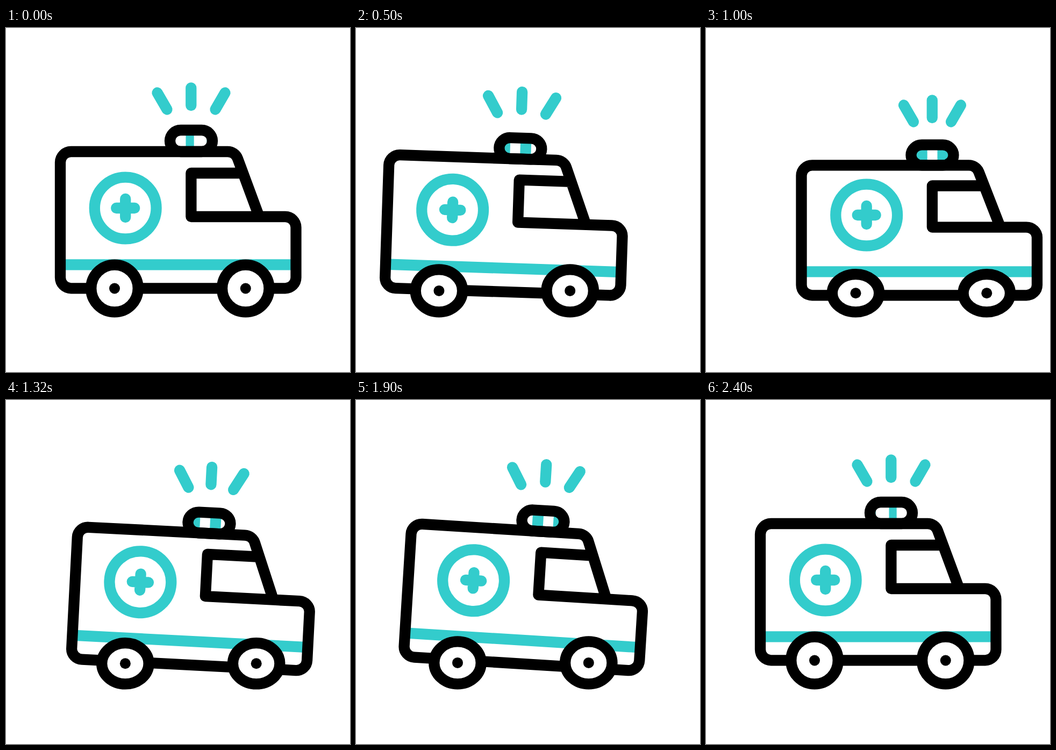
An HTML page that plays this animation: 640x640 px, repeating every 2.42 s.

```html
<!DOCTYPE html>
<html lang="en">
<head>
<meta charset="utf-8">
<title>Ambulance</title>
<style>
  html, body { margin: 0; width: 100%; height: 100%; overflow: hidden; background: #fff; }
  svg { display: block; width: 100%; height: 100%; }
  .line { fill: none; stroke: #000; stroke-width: 20.3; stroke-linejoin: round; }
  .teal { fill: none; stroke: #33cccc; stroke-width: 20.3; stroke-linecap: round; }
  .wheel { fill: #fff; stroke: #000; stroke-width: 20.3; }
</style>
</head>
<body>
<svg viewBox="0 0 640 640">
  <defs>
    <clipPath id="lampClip"><rect id="lampHole" x="305" width="79" rx="20"/></clipPath>
  </defs>
  <g id="car">
    <path id="rayL" class="teal" d="M281.5 120.5L299.5 151.5"/>
    <path id="rayM" class="teal" d="M344.3 111.5V144"/>
    <path id="rayR" class="teal" d="M407.5 120.5L389.5 151.5"/>
    <path d="M101 440.3H539.5" stroke="#33cccc" stroke-width="20.3"/>
    <circle class="teal" cx="222.2" cy="335" r="57.4"/>
    <path id="plus" class="teal"/>
    <g id="bands" clip-path="url(#lampClip)" fill="#33cccc">
      <rect/><rect/><rect/>
    </g>
    <rect id="lamp" class="line" x="305" width="79" rx="20"/>
    <path id="body" class="line"/>
  </g>
  <g id="wheels">
    <ellipse class="wheel" cx="202" rx="43.7"/>
    <ellipse class="wheel" cx="445.8" rx="43.7"/>
    <circle cx="202" r="10"/>
    <circle cx="445.8" r="10"/>
  </g>
</svg>
<script>
  const LOOP = 2420, STEP = 20, BEAT = 400;
  const FLOOR = 528.4, BASE = 484.3;
  const BAND = 20.2, GAP = 39;
  const $ = id => document.getElementById(id);
  const set = (el, attrs) => {
    for (const k in attrs) el.setAttribute(k, attrs[k]);
  };
  const mix = (a, b, k) => a + (b - a) * k;

  // Sine-eased interpolation through [time, value] keys
  function ease(keys, t) {
    for (let i = 1; i < keys.length; i++) {
      const [t0, a] = keys[i - 1], [t1, b] = keys[i];
      if (t <= t1) return mix(a, b, (1 - Math.cos(Math.PI * (t - t0) / (t1 - t0))) / 2);
    }
    return keys[keys.length - 1][1];
  }

  const DRIVE = [[0, 0], [600, -51], [1000, 76.5], [1600, -26], [2200, 0]];
  const TILT = [[0, 0], [400, 3.1], [800, -5], [1200, 5], [1600, -5], [2000, 5], [2400, 0]];
  const PULSE = [[0, 0], [400, -1], [800, 1], [1200, -1], [1600, 1], [2000, -1], [2400, 0]];

  // Rays swing in and out on each beat, resting at both ends of the loop
  const RAYS = [[0, 0]];
  for (let t = 200; t < 2400; t += 200) RAYS.push([t, t % BEAT ? 10 : -10]);
  RAYS.push([2400, 0]);

  function drawBody(s) {
    const y = v => BASE - (BASE - v) * s;
    const arc = (x, v) => `A20 ${20 * s} 0 0 1 ${x} ${y(v)}`;
    $('body').setAttribute('d',
      `M101 ${y(250)}${arc(121, 230)}H412${arc(431, 243)}L471 ${y(351)}` +
      `H519.5${arc(539.5, 371)}V${y(464.3)}${arc(519.5, BASE)}H121${arc(101, 464.3)}Z` +
      `M441 ${y(270)}H344.4V${y(351)}H471`);
    const box = { y: y(190), height: 40 * s, ry: 20 * s };
    set($('lamp'), box);
    set($('lampHole'), box);
  }

  function drawBands(t) {
    const shift = (19.3 + GAP * t / BEAT) % GAP;
    const cutL = 6 * Math.max(0, (t - 2340) / 60);
    const cutR = 5 * Math.max(0, 1 - t / 60);
    [...$('bands').children].forEach((r, i) => set(r, {
      x: 315.2 + shift + (i - 1) * GAP + cutL,
      y: 180, width: BAND - cutL - cutR, height: 70
    }));
  }

  function draw(t) {
    const dx = ease(DRIVE, t);
    const squash = (1 - Math.cos(2 * Math.PI * t / BEAT)) / 2;
    const ray = ease(RAYS, t);
    const arm = 17 + 3.25 * ease(PULSE, t);

    drawBody(1 - 0.049 * squash);
    drawBands(t);
    set($('car'), {
      transform: `translate(${dx} ${13 * squash}) rotate(${ease(TILT, t)} 320 ${BASE})`
    });
    set($('rayL'), { transform: `translate(${ray} ${ray})` });
    set($('rayM'), { transform: `translate(0 ${ray})` });
    set($('rayR'), { transform: `translate(${-ray} ${ray})` });
    set($('plus'), { d: `M${222.2 - arm} 335h${2 * arm}M222.2 ${335 - arm}v${2 * arm}` });

    const ry = 43.9 - 8.8 * squash;
    set($('wheels'), { transform: `translate(${dx} 0)` });
    for (const el of $('wheels').children) {
      set(el, { cy: FLOOR - ry });
      if (el.tagName === 'ellipse') set(el, { ry });
    }
  }

  const start = performance.now();
  function tick() {
    const t = (performance.now() - start) % LOOP;
    draw(Math.floor(t / STEP) * STEP);
    requestAnimationFrame(tick);
  }
  tick();
</script>
</body>
</html>
```
